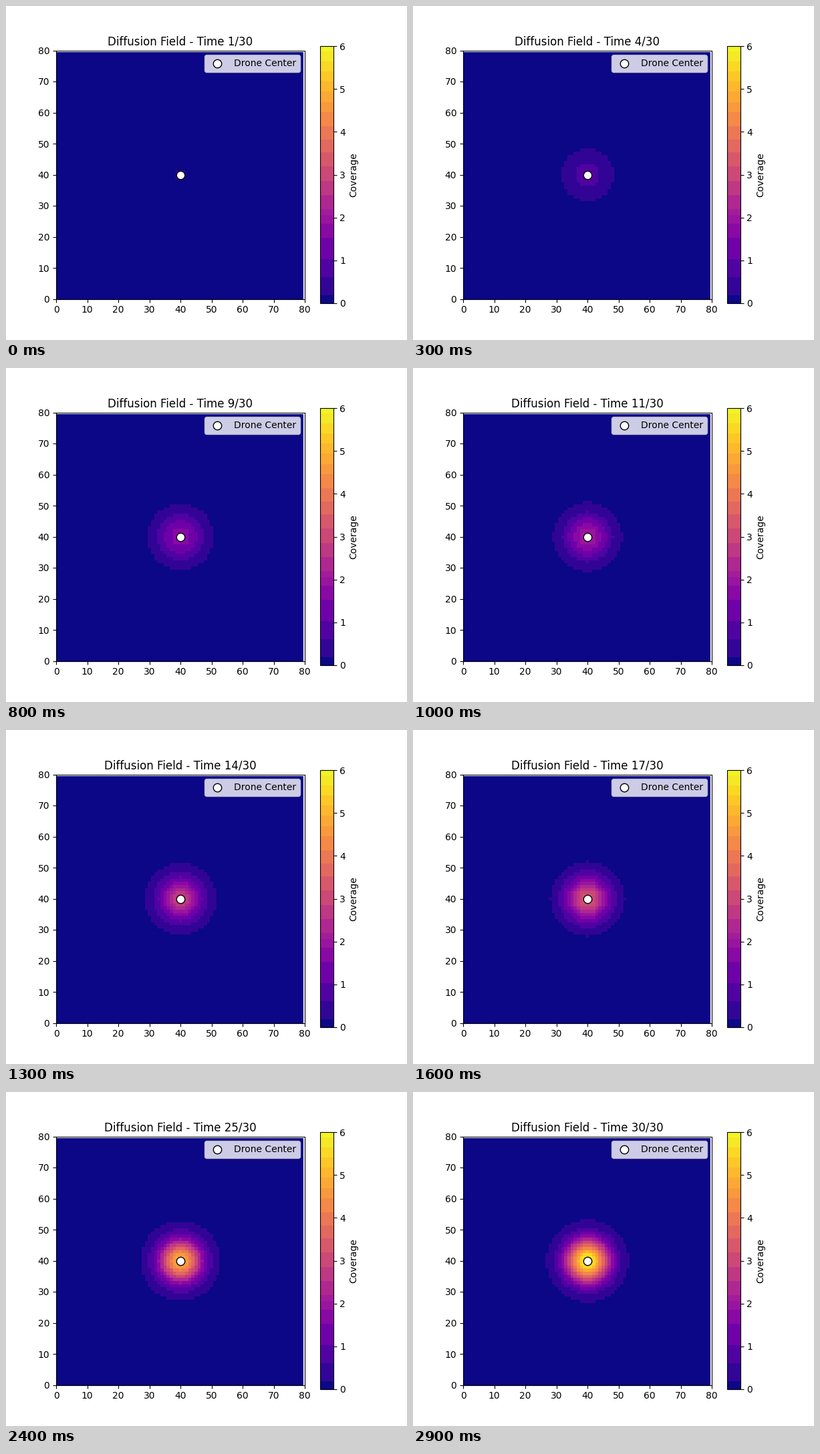
Animation, 600 px wide and 500 px high, one loop 3000 ms. Source, as a matplotlib script:

```python
import numpy as np
import matplotlib.pyplot as plt
from matplotlib.animation import FuncAnimation
from matplotlib.colors import ListedColormap

SIZE = 80
STEPS = 30
SIGMA = 5
RATE = 0.2  # coverage gained at the centre per step
VMAX = 6

# Edges of the colour bands, as indices into the 256-level plasma map
EDGES = [0, 8, 26, 44, 65, 79, 88, 94, 108, 122, 136, 150, 163,
         176, 190, 200, 211, 221, 231, 241, 251, 256]


def banded_plasma():
    base = plt.get_cmap("plasma")(np.arange(256))
    colors = base.copy()
    for lo, hi in zip(EDGES[1:-1], EDGES[2:]):
        colors[lo:hi] = base[lo:hi].mean(axis=0)
    colors[:EDGES[1]] = base[0]
    return ListedColormap(colors)


y, x = np.mgrid[:SIZE, :SIZE]
center = SIZE // 2
spread = np.exp(-((x - center) ** 2 + (y - center) ** 2) / (2 * SIGMA ** 2))


def field(step):
    return RATE * step * spread


fig, ax = plt.subplots(figsize=(6, 5), dpi=100)
image = ax.imshow(field(1), origin="lower", cmap=banded_plasma(),
                  vmin=0, vmax=VMAX)
fig.colorbar(image, ax=ax, label="Coverage")
ax.scatter([center], [center], s=80, c="white", edgecolors="black",
           linewidths=1, label="Drone Center")
ax.set_xlim(0, SIZE)
ax.set_ylim(0, SIZE)
ax.set_xticks(range(0, SIZE + 1, 10))
ax.set_yticks(range(0, SIZE + 1, 10))
ax.legend(loc="upper right")
title = ax.set_title("")


def update(frame):
    step = frame + 1
    image.set_data(field(step))
    title.set_text(f"Diffusion Field - Time {step}/{STEPS}")
    return image, title


anim = FuncAnimation(fig, update, frames=STEPS, interval=100,
                     repeat=True, repeat_delay=0, blit=False)
plt.show()
```
